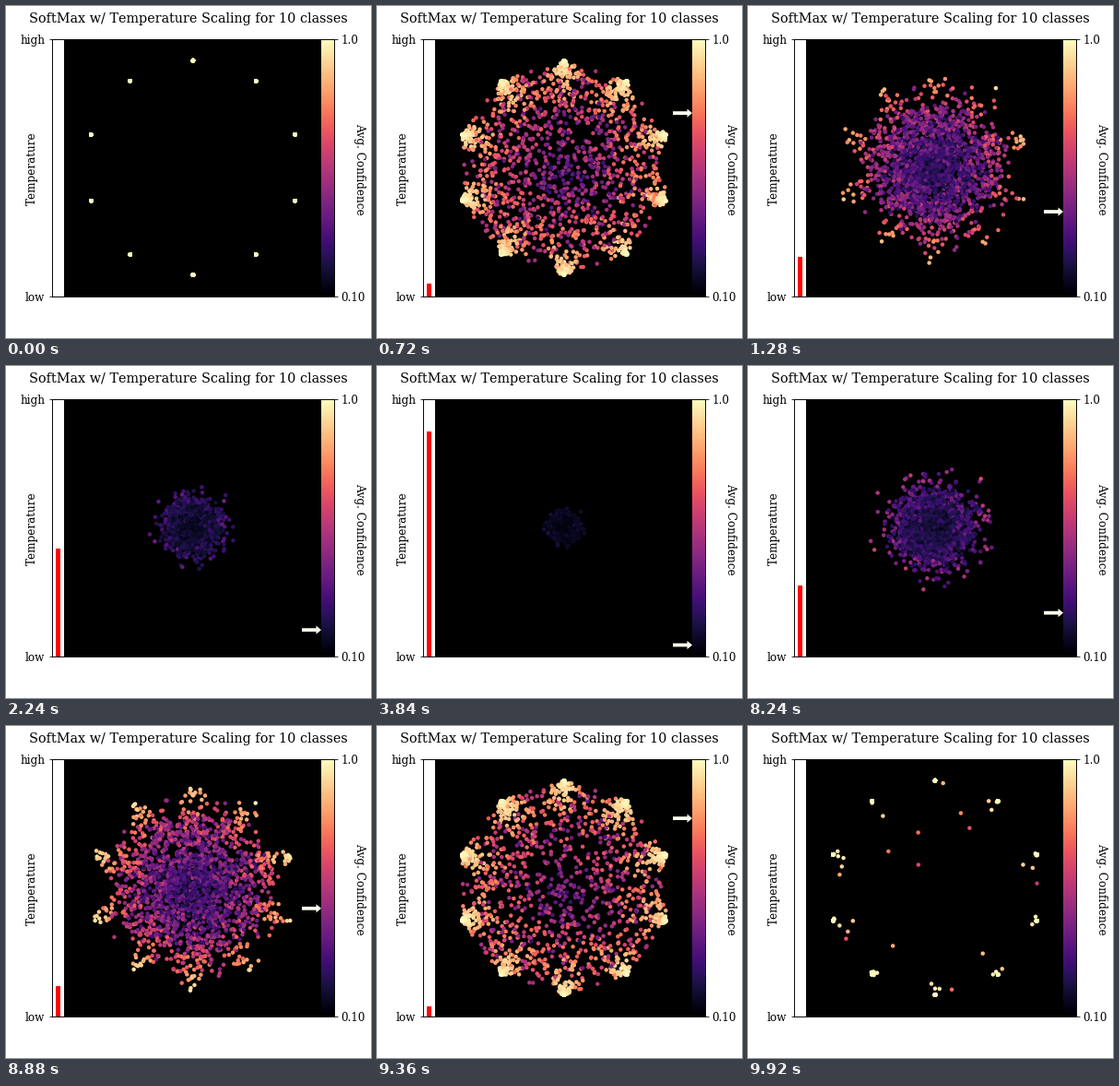
Animation of 396x360 px, one loop 10 s. Source, as a matplotlib script:

```python
import numpy as np
import matplotlib.pyplot as plt
from matplotlib.animation import FuncAnimation
from matplotlib.patches import Polygon, Rectangle

W, H, DPI = 396, 360, 72
FRAMES, INTERVAL = 125, 80
CLASSES, SAMPLES, MAX_TEMP = 10, 2000, 5.0

# Stage layout in pixels, y pointing down
LEFT, RIGHT, TOP, BOTTOM = 49.5, 356.4, 35.9, 314.9
UNIT = (RIGHT - LEFT) / 22
CENTER = np.array([(LEFT + RIGHT) / 2, (TOP + BOTTOM) / 2])
RADIUS = 116.25

plt.rcParams.update({"font.family": "DejaVu Serif", "font.size": 12,
                     "text.kerning_factor": 6})

np.random.seed(0)
logits = np.random.randn(SAMPLES, CLASSES)
logits -= logits.max(axis=1, keepdims=True)
angles = 2 * np.pi * np.arange(CLASSES) / CLASSES
corners = CENTER + RADIUS * np.column_stack([np.sin(angles), -np.cos(angles)])


def softmax(temp):
    e = np.exp(logits / max(temp, 1e-9))
    return e / e.sum(axis=1, keepdims=True)


def level_y(level):
    """Height on the stage for a level from 0 (bottom) to 1 (top)."""
    return BOTTOM - level * (BOTTOM - TOP)


def arrow_points(y):
    tail, neck, tip = 321, 336.5, 342
    return [(tail, y - 1.9), (neck, y - 1.9), (neck, y - 4.6), (tip, y),
            (neck, y + 4.6), (neck, y + 1.9), (tail, y + 1.9)]


fig = plt.figure(figsize=(W / DPI, H / DPI), dpi=DPI, facecolor="white")
ax = fig.add_axes([LEFT / W, 1 - BOTTOM / H, (RIGHT - LEFT) / W, (BOTTOM - TOP) / H])
ax.set(xlim=(LEFT, RIGHT), ylim=(BOTTOM, TOP), xticks=[])
ax.set_yticks([TOP, BOTTOM], ["high", "low"])
right = ax.twinx()
right.set_ylim(BOTTOM, TOP)
right.set_yticks([TOP, BOTTOM], ["1.0", "0.10"])

fig.suptitle("SoftMax w/ Temperature Scaling for 10 classes")
fig.text(28 / W, 1 - 176 / H, "Temperature", rotation=90, ha="center", va="center")
fig.text(384 / W, 1 - 177 / H, "Avg. Confidence", rotation=270,
         ha="center", va="center")

ax.add_patch(Rectangle((LEFT + UNIT, TOP), 20 * UNIT, BOTTOM - TOP, color="black", lw=0))
ax.imshow(np.linspace(1, 0, 256)[:, None], cmap="magma", aspect="auto",
          extent=(RIGHT - UNIT, RIGHT, BOTTOM, TOP), zorder=2)
ax.set(xlim=(LEFT, RIGHT), ylim=(BOTTOM, TOP))

bar = ax.add_patch(Rectangle((54, BOTTOM), 5, 0, color="red", lw=0))
dots = ax.scatter(*np.zeros((2, SAMPLES)), c=np.zeros(SAMPLES), s=20, linewidths=0,
                  cmap="magma", vmin=0.1, vmax=1, zorder=3)
arrow = ax.add_patch(Polygon(arrow_points(TOP), color="#fffff0", lw=0, zorder=4))


def update(i):
    heat = np.sin(np.pi * i / FRAMES) ** 2
    probs = softmax(MAX_TEMP * heat)
    peak = probs.max(axis=1)
    mean = peak.mean()
    dots.set_offsets(probs @ corners)
    dots.set_array(peak)
    bar.set_height(level_y(heat) - BOTTOM)
    arrow.set_xy(arrow_points(level_y((mean - 0.1) / 0.9)))
    arrow.set_visible(bool(mean < 0.99))
    return dots, bar, arrow


anim = FuncAnimation(fig, update, frames=FRAMES, interval=INTERVAL,
                     repeat=True, repeat_delay=0)
plt.show()
```
